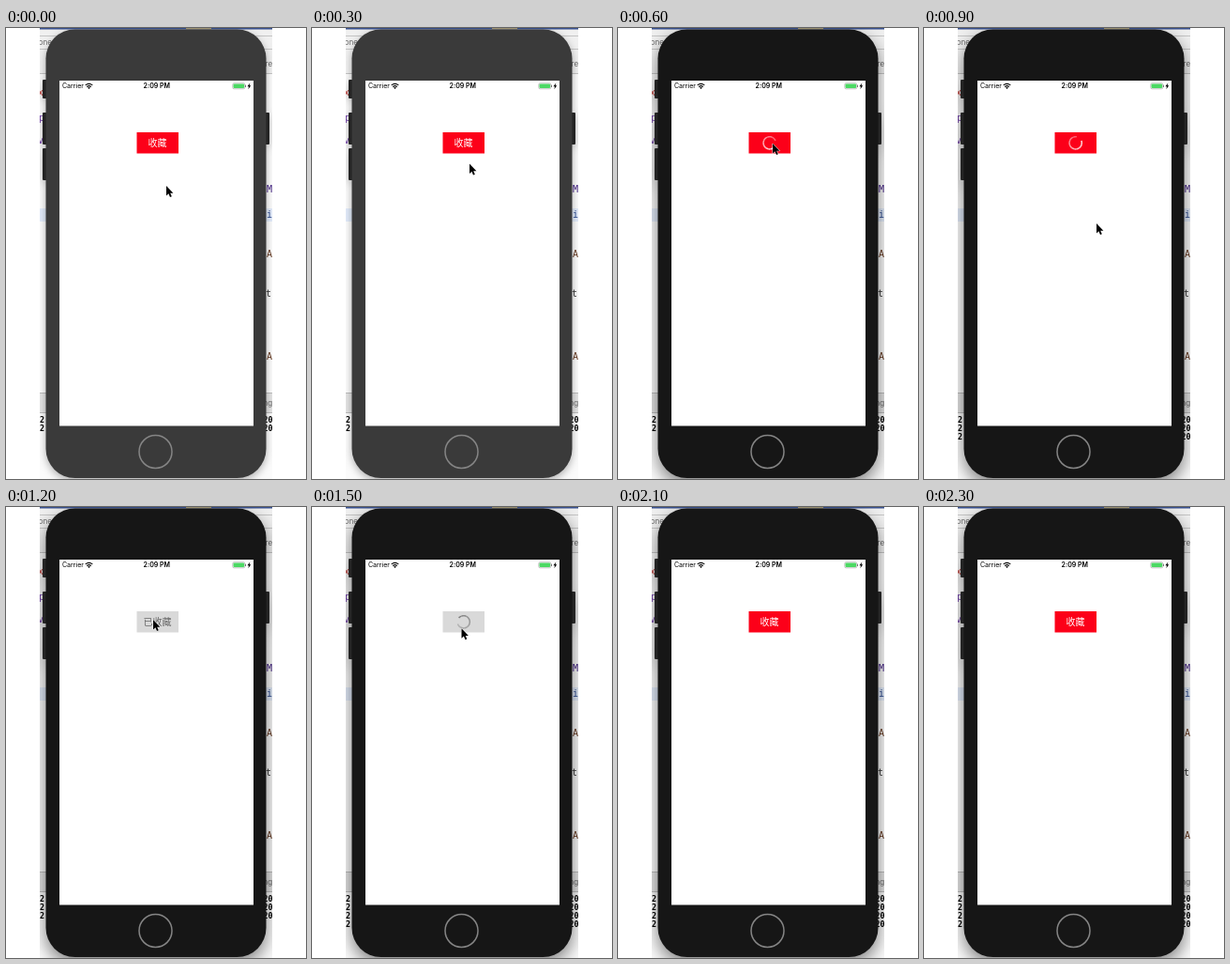
These frames come from a looping animation (320x480 px, 2400 ms). An HTML page:

```html
<!DOCTYPE html>
<html lang="zh">
<head>
<meta charset="utf-8">
<title>Favourite button</title>
<style>
html, body { margin: 0; width: 100%; height: 100%; overflow: hidden; background: #fff; }
svg { display: block; width: 320px; height: 480px; }
text { font-family: Inter, "Liberation Sans", sans-serif; }
.code text { font: 10px "DejaVu Sans Mono", "Noto Sans Mono", monospace; }
#logs text { font: bold 8.3px "DejaVu Sans Mono", "Noto Sans Mono", monospace; }
#label { font: 10px "Noto Sans CJK SC", "Noto Sans CJK", sans-serif; }
#phone { fill: #3a3a3a; filter: drop-shadow(0 3px 4px rgba(0,0,0,.3)); }
#phone.active { fill: #161616; filter: drop-shadow(0 7px 9px rgba(0,0,0,.5)); }
</style>
</head>
<body>
<svg viewBox="0 0 320 480">
  <clipPath id="window"><path d="M36 0H284V480H36Z"/></clipPath>
  <g clip-path="url(#window)">
    <!-- editor behind the phone -->
    <path d="M36 0H284V480H36Z" fill="#fbfbfb"/>
    <path d="M36 0H284V48H36Z" fill="#f0f0f0"/>
    <path d="M36 0H284V1.5H36Z" fill="#38518f"/>
    <path d="M192 0H219V1.5H192Z" fill="#a79b78"/>
    <path d="M36 8.5H284M36 22.5H284M36 48.5H284" stroke="#c4c4c4"/>
    <path d="M36 192H284V206H36Z" fill="#e2ebfa"/>
    <path d="M36 388H284V409H36Z" fill="#e3e3e3"/>
    <path d="M36 388.5H284M36 409.5H284" stroke="#bbb"/>
    <g font-size="8" fill="#666">
      <text x="30" y="18">hone</text>
      <text x="274" y="41">tree</text>
      <text x="274.5" y="402">ng</text>
    </g>
    <g class="code">
      <text x="34" y="72" fill="#c33a35">x</text>
      <text x="35" y="99" fill="#703daa">p</text>
      <text x="34" y="123" fill="#703daa">v</text>
      <text x="278" y="175" fill="#3f1d81">M</text>
      <text x="278" y="202" fill="#27458a">i</text>
      <text x="278" y="244" fill="#643820">A</text>
      <text x="277" y="286" fill="#333">t</text>
      <text x="278" y="353" fill="#643820">A</text>
    </g>
    <g id="logs"></g>

    <g id="phone">
      <g fill="#242424">
        <rect x="39" y="55" width="6" height="20" rx="1"/>
        <rect x="39" y="90" width="6" height="34" rx="1"/>
        <rect x="39" y="128" width="6" height="34" rx="1"/>
        <rect x="275" y="90" width="6" height="34" rx="1"/>
      </g>
      <rect x="42.5" y="1.5" width="235" height="477.5" rx="31"/>
    </g>
  </g>
  <path d="M57 56H264V423.5H57Z" fill="#fff"/>
  <circle cx="159.5" cy="451" r="17.5" fill="none" stroke="#858585" stroke-width="1.5"/>

  <!-- status bar -->
  <text x="60" y="64.2" font-size="7">Carrier</text>
  <text x="160.8" y="64.2" font-size="7" font-weight="600" text-anchor="middle">2:09 PM</text>
  <g fill="none" stroke="#000" stroke-width="1.2">
    <path d="M84.7 60.9Q88.5 57.7 92.3 60.9M86.2 62.6Q88.5 60.8 90.8 62.6"/>
  </g>
  <path d="M87.1 63.6Q88.5 62.5 89.9 63.6L88.5 65.1Z"/>
  <rect x="241.8" y="58.8" width="13" height="6" rx="1.5" fill="none" stroke="#999" stroke-width=".6"/>
  <rect x="242.5" y="59.5" width="11.6" height="4.6" rx="1" fill="#4cd964"/>
  <path d="M255.5 60.7V63" stroke="#777"/>
  <path d="M260.3 58.5L257.4 62.2H259L258.4 65.2 261.2 61.2H259.6Z"/>

  <path id="button" d="M139.5 111H184V133.5H139.5Z"/>
  <text id="label" x="161.6" y="125.8" text-anchor="middle"></text>
  <g id="spinner" fill="none" stroke-width="1.5"></g>
  <g id="ring" fill="none">
    <circle cx="165.5" cy="124" r="15.7" stroke="#222" stroke-width="1.6"/>
    <circle cx="165.5" cy="124" r="14.5" stroke="#fff" stroke-opacity=".55" stroke-width=".8"/>
  </g>
  <path id="cursor" d="M0 0V10.5L2.4 8.3 4 12 5.8 11.2 4.2 7.7H7.4Z" stroke="#fff" stroke-width=".9" paint-order="stroke"/>
</svg>
<script>
const $ = id => document.getElementById(id);
const LOOP = 2400, STEP = 100;
const RED = '#fc0019', GREY = '#d9d9d9';

// time, x, y of the pointer tip
const track = [
  [0, 171, 168], [200, 171, 166], [400, 165, 123], [600, 165, 123],
  [900, 184, 208], [1200, 157, 120], [1400, 157, 120], [1800, 173, 179], [2100, 178, 196]
];

const within = (t, a, b) => t >= a && t < b;
const show = (id, on) => $(id).style.display = on ? '' : 'none';

function pointer(t) {
  const i = track.findIndex(p => p[0] > t);
  if (i < 0) return track[track.length - 1].slice(1);
  const [t0, x0, y0] = track[i - 1], [t1, x1, y1] = track[i];
  const k = (t - t0) / (t1 - t0), e = k * k * (3 - 2 * k);
  return [x0 + (x1 - x0) * e, y0 + (y1 - y0) * e];
}

// spinner: short arcs that fade along the circle
const PARTS = 20, SWEEP = 300;
const polar = deg => {
  const a = deg * Math.PI / 180;
  return `${6.6 * Math.cos(a)} ${6.6 * Math.sin(a)}`;
};
$('spinner').innerHTML = Array.from({ length: PARTS }, (_, i) => {
  const a = i * SWEEP / PARTS, b = a + SWEEP / PARTS;
  return `<path d="M${polar(a)}A6.6 6.6 0 0 1 ${polar(b)}" opacity="${0.95 - 0.6 * i / PARTS}"/>`;
}).join('');

$('logs').innerHTML = [0, 1, 2, 3].map(i => {
  const y = 420 + i * 9.1;
  return `<g><text x="36" y="${y}">2</text><text x="274.5" y="${y}">2018</text></g>`;
}).join('');

function draw(now) {
  const t = Math.floor(now % LOOP / STEP) * STEP;
  const saved = within(t, 1100, 1700);
  const busy = within(t, 600, 1100) || within(t, 1400, 1700);
  const pressed = within(t, 500, 600);

  $('phone').setAttribute('class', t >= 600 ? 'active' : '');
  $('button').setAttribute('fill', saved ? GREY : RED);
  $('label').textContent = saved ? '已收藏' : '收藏';
  $('label').setAttribute('fill', saved ? '#666' : pressed ? '#ffb0b8' : '#fff');
  show('label', !busy);

  show('spinner', busy);
  $('spinner').setAttribute('stroke', saved ? '#777' : '#fff');
  $('spinner').setAttribute('transform', `translate(161.7 122.3) rotate(${t - 560})`);

  show('ring', pressed || within(t, 1300, 1400));
  $('ring').setAttribute('transform', t > 1000 ? 'translate(-8 -3)' : '');
  show('cursor', t < 2100);
  $('cursor').setAttribute('transform', `translate(${pointer(t)})`);

  const lines = t < 700 ? 2 : t < 1500 ? 3 : 4;
  [...$('logs').children].forEach((g, i) => g.style.display = i < lines ? '' : 'none');
}

const start = performance.now();
function tick() {
  draw(performance.now() - start);
  requestAnimationFrame(tick);
}
tick();
</script>
</body>
</html>
```
